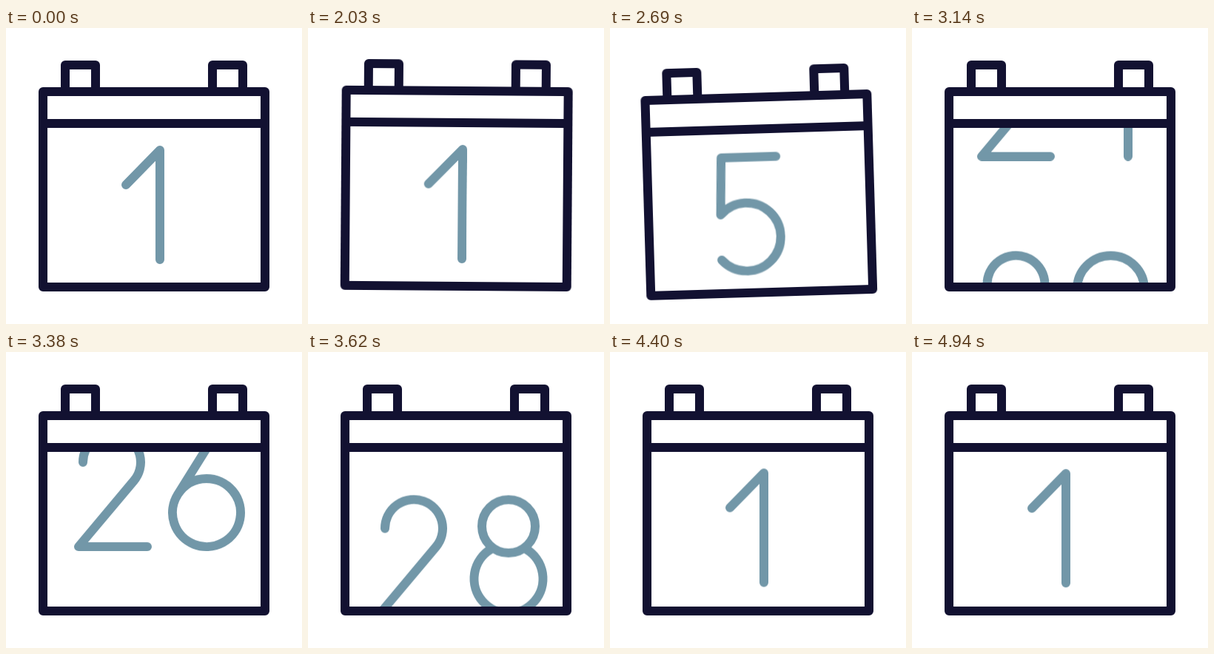
Recreate the animation shown at these times as an HTML page without scripts. Size 400 px wide and 400 px high, loop 4.97 s.

```html
<!DOCTYPE html>
<html lang="en">
<head>
<meta charset="utf-8">
<title>Calendar</title>
<style>
html, body { margin: 0; width: 100%; height: 100%; overflow: hidden; background: #fff; }
svg { display: block; width: 100%; height: 100%; }
.calendar, .digits {
  fill: none; stroke-width: 12; stroke-linecap: round; stroke-linejoin: round;
}
.calendar { stroke: #121131; transform-origin: 200px 200px; animation: hop 4970ms linear infinite; }
.digits { stroke: #7297a8; }
.reel { animation: roll 4970ms linear infinite; }
.last { animation: land 4970ms linear infinite; }

@keyframes hop {
  0% { transform: none; }
  40.241% { transform: translate(0, 0) rotate(0deg); animation-timing-function: cubic-bezier(.3, .15, .6, 1); }
  49.899% { transform: translate(20px, -25px) rotate(10deg); animation-timing-function: cubic-bezier(.42, 0, .58, 1); }
  54.326% { transform: translate(.7px, 7.6px) rotate(-1.74deg); animation-timing-function: cubic-bezier(.42, 0, .58, 1); }
  60.362%, 100% { transform: translate(0, 0) rotate(0deg); }
}

/* rows are 287px apart */
@keyframes roll {
  0% { transform: translateY(0); }
  48.29% { transform: translateY(0); animation-timing-function: cubic-bezier(.5, 0, .75, .6); }
  54.125% { transform: translateY(287px); }
  63.179% { transform: translateY(1002px); }
  72.837% { transform: translateY(1755px); }
  80.08% { transform: translateY(2307px); }
  82.495%, 100% { transform: translateY(2491px); }
}

@keyframes land {
  0% { transform: translateY(-200px); }
  84.608% { transform: translateY(-192px); animation-timing-function: cubic-bezier(.25, .6, .5, 1); }
  90.141% { transform: translateY(9px); animation-timing-function: cubic-bezier(.4, 0, .5, 1); }
  95.573% { transform: translateY(0); }
  99.396%, 100% { transform: translateY(-.8px); }
}
</style>
</head>
<body>
<svg viewBox="0 0 400 400">
  <defs>
    <clipPath id="page"><rect x="50" y="129" width="300" height="221"/></clipPath>
    <path id="one" d="M162 212L208 165V313"/>
    <path id="d1" d="M235 213L284 165V318"/>
    <path id="d2" d="M104 204A39 39 0 1 1 172.7 229L98 318H191"/>
    <path id="d3" d="M109 190A40 37 0 1 1 148 239H138M148 239A46 39.5 0 1 1 104.5 292"/>
    <path id="d4" d="M275 165L219 272H318M292 232V318"/>
    <path id="d5" d="M224.4 165H150.3L147.5 242A46 46 0 1 1 147.2 303"/>
    <path id="d6" d="M283.6 165L232 247.6A46 46 0 1 0 271 226Q246 226 232 247.6"/>
    <path id="d8" d="M247 232A46.5 46.5 0 1 0 295 232M235 201a36 36 0 1 1 72 0a36 36 0 1 1 -72 0"/>
    <rect id="d0" x="223" y="165" width="91" height="153" rx="45.5"/>
  </defs>
  <g class="calendar">
    <g class="digits" clip-path="url(#page)">
      <g class="reel">
        <use href="#one"/>
        <use href="#d5" y="-287"/>
        <g transform="translate(0 -574)"><use href="#d1" x="-126"/><use href="#d0" x="-23"/></g>
        <g transform="translate(0 -861)"><use href="#d2" x="-2.5"/><use href="#d0"/></g>
        <g transform="translate(0 -1148)"><use href="#d2" x="-4"/><use href="#d4"/></g>
        <g transform="translate(0 -1435)"><use href="#d2"/><use href="#d6"/></g>
        <g transform="translate(0 -1722)"><use href="#d2"/><use href="#d8"/></g>
        <g transform="translate(0 -2009)"><use href="#d3" x="-7"/><use href="#d0"/></g>
        <g transform="translate(0 -2296)"><use href="#d3"/><use href="#d1"/></g>
      </g>
      <use class="last" href="#one"/>
    </g>
    <path d="M50 86H350V350H50ZM50 129H350M80 86V50H121V86M279 86V50H320V86"/>
  </g>
</svg>
</body>
</html>
```
